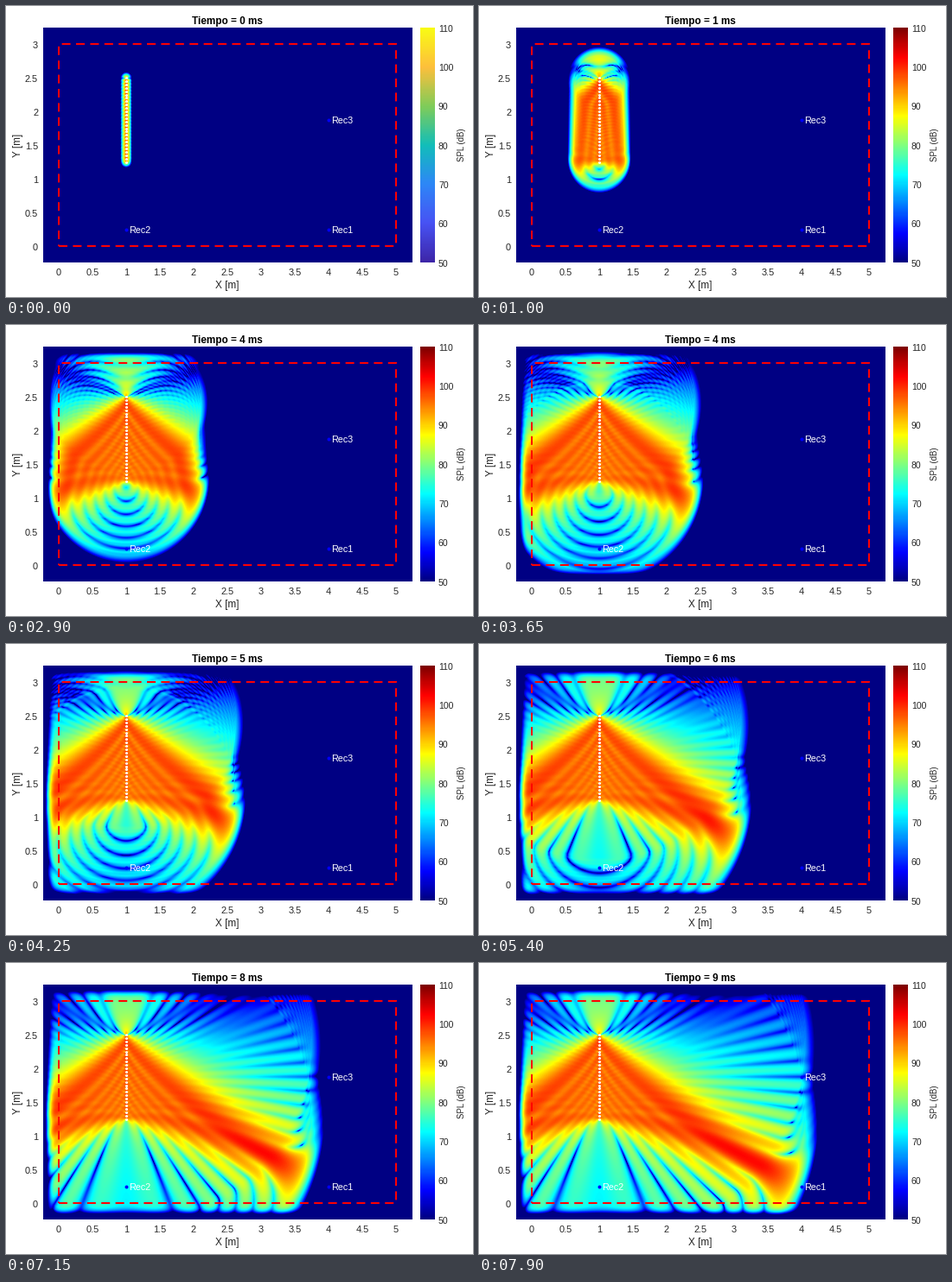
Write a matplotlib script that moves like this. It is 540 px wide and 337 px high and loops after 8 s.

```python
import numpy as np
import matplotlib.pyplot as plt
from matplotlib.animation import FuncAnimation
from matplotlib.colors import LinearSegmentedColormap, ListedColormap
from matplotlib.patches import Rectangle

W, H, DPI = 540, 337, 100
PX = 72 / DPI                      # points per pixel
LEFT, TOP, RIGHT, BOTTOM = 43, 25, 470, 297
X0, Y0, SCALE = 61, 278, 78        # pixel of the room corner, pixels per metre
LOOP, TICK, STEP = 8000, 50, 112.4
STEPS = int((LOOP - TICK) / STEP) + 1

WAVELENGTH = 0.098
FOCUS = (4, 0.25)
SOURCES = np.linspace(2.5, 1.25, 26)
REF = 78.5                         # dB for unit amplitude
FLOOR, CEIL = 50, 110

plt.rcParams["font.family"] = "Liberation Sans"


def jet_map(n=256):
    v = np.arange(1, n + 1) / n
    rgb = [np.clip(1.5 - np.abs(4 * v - c), 0, 1) for c in (3, 2, 1)]
    return ListedColormap(np.transpose(rgb))


JET = jet_map()
PARULA = LinearSegmentedColormap.from_list("parula", [
    (.242, .150, .660), (.281, .323, .958), (.179, .529, .968),
    (.070, .746, .726), (.504, .800, .349), (.996, .750, .236),
    (.977, .984, .081)])

# Field of each source on the pixel grid
gx = ((np.arange(LEFT, RIGHT) + 0.5 - X0) / SCALE)[None, :]
gy = ((Y0 - np.arange(TOP, BOTTOM) - 0.5) / SCALE)[:, None]


def make_field(y):
    """Distance, onset sharpness and focused wave of one source."""
    r = np.hypot(gx - 1, gy - y)
    lead = np.hypot(FOCUS[0] - 1, FOCUS[1] - y)
    wave = np.exp(-2j * np.pi / WAVELENGTH * (r - lead))
    wave /= np.sqrt(np.maximum(r, 0.012))
    if y in SOURCES[[0, -1]]:
        wave *= 0.5
    sharp = 1 / (0.09 + 0.05 * r)
    return r.astype(np.float32), sharp.astype(np.float32), wave.astype(np.complex64)


fields = [make_field(y) for y in SOURCES]


def outside(v, top):
    return np.maximum(np.maximum(-v, v - top), 0) / 0.24


# Absorbing layer around the room
loss = 90 * (outside(gx, 5) ** 3 + outside(gy, 3) ** 3)


def level(k):
    front = np.float32(0.12 + 0.0454 * k if k else 0.095)
    total = np.zeros(loss.shape, np.complex64)
    for r, sharp, wave in fields:
        gate = np.clip((front - r) * sharp, 0, 1)
        total += gate * gate * wave
    spl = REF + 20 * np.log10(np.abs(total) + 1e-6) - loss
    return np.clip(spl, FLOOR, CEIL)


levels = [level(k) for k in range(STEPS)]

fig = plt.figure(figsize=(W / DPI, H / DPI), dpi=DPI, facecolor="white")


def pixel_axes(x0, y0, x1, y1):
    ax = fig.add_axes([x0 / W, 1 - y1 / H, (x1 - x0) / W, (y1 - y0) / H])
    ax.set_axis_off()
    return ax


def label(x, y, s, size=11, color="#262626", ha="center", **kw):
    va = "center" if "rotation" in kw else "center_baseline"
    return fig.text(x / W, 1 - y / H, s, fontsize=size * PX, color=color,
                    ha=ha, va=va, **kw)


ax = pixel_axes(LEFT, TOP, RIGHT, BOTTOM)
extent = [(LEFT - X0) / SCALE, (RIGHT - X0) / SCALE,
          (Y0 - BOTTOM) / SCALE, (Y0 - TOP) / SCALE]
image = ax.imshow(levels[0], cmap=JET, vmin=FLOOR, vmax=CEIL, extent=extent,
                  aspect="auto", interpolation="nearest")
ax.add_patch(Rectangle((0, 0), 5, 3, fill=False, ec="red", lw=2 * PX,
                       ls=(0, (5, 3.2)), capstyle="butt"))
ax.plot(np.ones(len(SOURCES)), SOURCES, ls="", marker="o", ms=3 * PX,
        mfc="white", mec="none")
for name, x, y in (("Rec1", 4, 0.25), ("Rec2", 1, 0.25), ("Rec3", 4, 1.875)):
    ax.plot(x, y, "o", ms=4 * PX, mfc="blue", mec="none")
    label(X0 + SCALE * x + 3.5, Y0 - SCALE * y + 0.5, name, 10.8, "white", "left")
ax.set(xlim=extent[:2], ylim=extent[2:])

for i in range(11):
    label(X0 + 39 * i, 308, f"{i / 2:g}")
for i in range(7):
    label(37, Y0 - 39 * i + 0.7, f"{i / 2:g}", ha="right")
label(256, 323, "X [m]", 11.7)
label(13.5, 161, "Y [m]", 11.7, rotation=90)
title = label(256, 17, "", 11.8, "black", weight="bold")

cax = pixel_axes(479, TOP, 496, BOTTOM)
bar = cax.imshow(np.linspace(1, 0, 256)[:, None], cmap=JET, aspect="auto")
for i, db in enumerate(range(FLOOR, CEIL + 1, 10)):
    label(500, BOTTOM + 0.8 - (BOTTOM - TOP) * i / 6, db, 10.5, ha="left")
label(527, 160.5, "SPL (dB)", 9.7, rotation=90)


def update(i):
    k = int(i * TICK / STEP)
    image.set_data(levels[k])
    bar.set_cmap(JET if k else PARULA)
    title.set_text(f"Tiempo = {round(0.1275 * k + 0.37)} ms")
    return image, bar, title


anim = FuncAnimation(fig, update, frames=LOOP // TICK, interval=TICK,
                     repeat=True, repeat_delay=0, blit=False)
plt.show()
```
